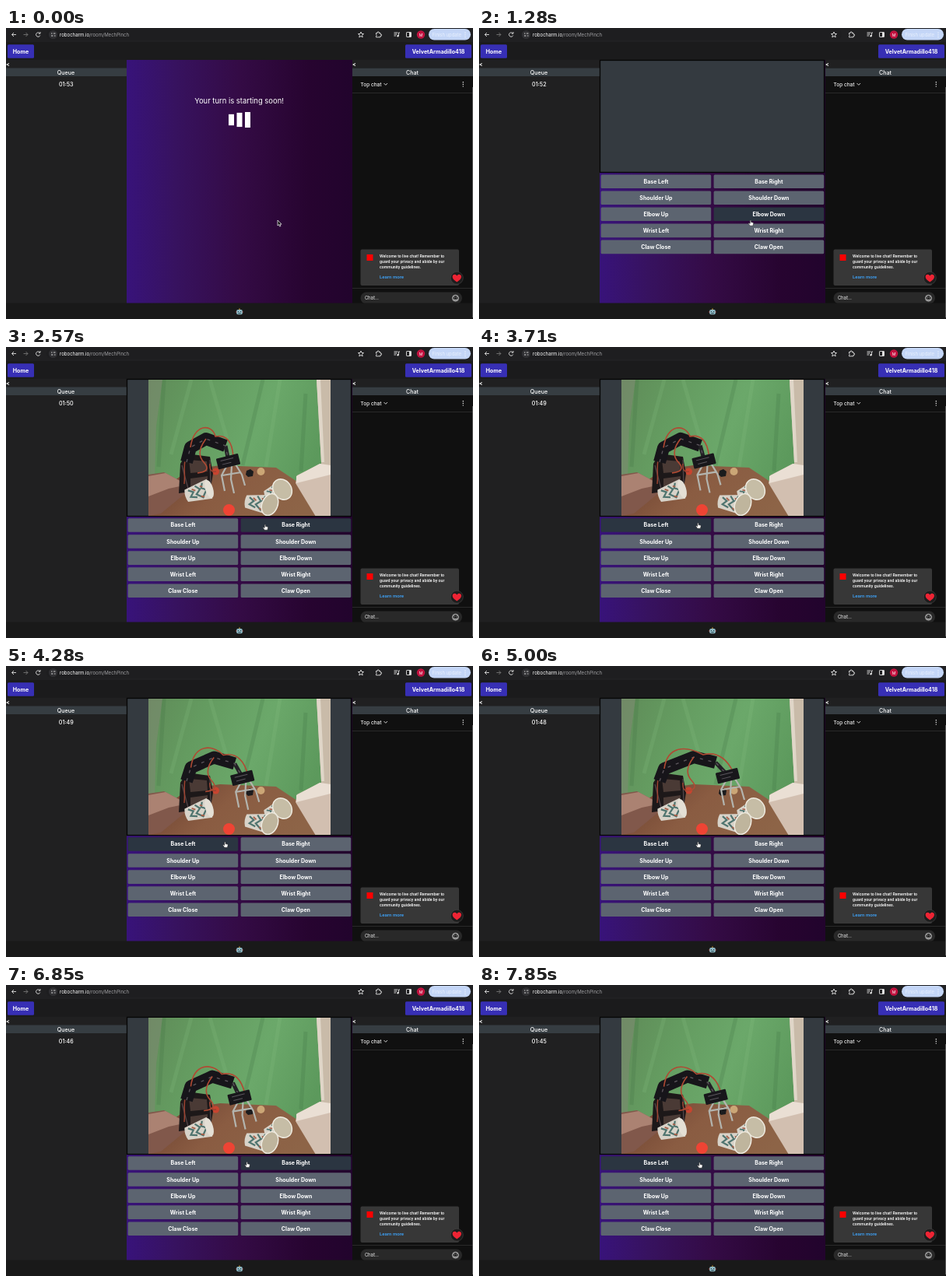
Animation, 600 px wide and 374 px high, one loop 8 s. Source, as an HTML page:

```html
<!DOCTYPE html>
<html lang="en">
<head>
<meta charset="utf-8">
<title>Robot room</title>
<style>
  html, body { margin: 0; width: 100%; height: 100%; overflow: hidden; background: #000; }
  svg { display: block; width: 100%; height: 100%; }
  text { font-family: Inter, sans-serif; fill: #fff; }
  .mid { text-anchor: middle; }
  .b { font-weight: 700; }
  .m { font-weight: 500; }
  .yt { font-family: Roboto, sans-serif; }
  .icon { fill: none; stroke: #e3e3e3; stroke-width: .9; }
</style>
</head>
<body>
<svg viewBox="0 0 600 374" preserveAspectRatio="none">
  <defs>
    <linearGradient id="purple">
      <stop offset="0" stop-color="#38137a"/>
      <stop offset=".22" stop-color="#37125f"/>
      <stop offset=".5" stop-color="#340b45"/>
      <stop offset=".8" stop-color="#270430"/>
      <stop offset="1" stop-color="#22042d"/>
    </linearGradient>
    <linearGradient id="cloth" x2="1" y2=".3">
      <stop offset="0" stop-color="#5f8b58"/>
      <stop offset=".3" stop-color="#649b60"/>
      <stop offset=".65" stop-color="#6ba86a"/>
      <stop offset="1" stop-color="#5c995c"/>
    </linearGradient>
    <linearGradient id="wood" x2="1" y2=".3">
      <stop offset="0" stop-color="#6a3f2f"/>
      <stop offset=".5" stop-color="#8a5c42"/>
      <stop offset="1" stop-color="#8d6447"/>
    </linearGradient>
    <clipPath id="photo"><rect x="183" y="42" width="234" height="175"/></clipPath>
    <g id="cup">
      <path d="M-18-8L13-13V13L-18 8Q-21 0-18-8Z" fill="#d8d3c9"/>
      <path d="M-14-6l6 4-5 5 8 3M-4-9l5 6-6 5 8 7M6-10l-3 6 6 4-7 8" fill="none" stroke="#4f746f" stroke-width="2.2"/>
      <path d="M-9-6l4 3M0 6l4 2M2-7l3 2" stroke="#a8604a" stroke-width="1.800"/>
    </g>
  </defs>

  <!-- browser bar -->
  <rect width="600" height="18" fill="#202022"/>
  <rect x="52" y="1.500" width="414" height="14" rx="7" fill="#1e1e20"/>
  <path class="icon" d="M13 8.500H7.500M10 6l-2.500 2.500L10 11M43.500 7a2.700 2.700 0 1 0 .3 2.500M44 5v2.200h-2.200"/>
  <path class="icon" style="stroke:#777" d="M22.500 8.500H28M25.500 6l2.500 2.500L25.500 11"/>
  <circle cx="60.500" cy="8.500" r="5.500" fill="#303033"/>
  <path class="icon" d="M58 7h1.500M61 7h2.500M58 10h2.500M62 10h1.500"/>
  <text x="69" y="10.700" font-size="6.050">robocharm.io<tspan fill="#a0a0a3">/room/MechPinch</tspan></text>
  <path class="icon" d="M456 5l1 2.400 2.500.2-1.900 1.700.6 2.500-2.200-1.300-2.200 1.300.6-2.500-1.900-1.700 2.500-.2z"/>
  <path class="icon" d="M475.500 6.500h1.700a1.100 1.100 0 1 1 2 0h1.800v1.700a1.100 1.100 0 1 1 0 2v1.600h-5.500v-1.500a1.100 1.100 0 0 0 0-2.100z"/>
  <path class="icon" d="M498.500 6h5M498.500 8h4M498.500 10h2.500M504.500 10V6h1.500"/>
  <circle cx="503.500" cy="10.300" r="1.200" fill="#e3e3e3"/>
  <rect class="icon" x="514.500" y="5.500" width="6" height="6" rx=".6"/>
  <path d="M518 5.500h2.500v6H518z" fill="#e3e3e3"/>
  <circle cx="533" cy="8.500" r="5.200" fill="#c2123f"/>
  <text class="mid" x="533" y="10.500" font-size="5.200">M</text>
  <rect x="543" y="1" width="54" height="14.500" rx="7.200" fill="#c4d6f7"/>
  <text x="547.500" y="10.600" font-size="5.900" style="fill:#e9f0fd">Finish update</text>
  <path d="M590 5.500v7" stroke="#eef3ff" stroke-width="1.200" stroke-dasharray="1.200 1.600"/>

  <!-- page frame -->
  <rect y="18" width="600" height="23.500" fill="#1b1b1c"/>
  <rect x="2" y="21.200" width="34" height="17.500" rx="1.500" fill="#372fb5"/>
  <text class="mid b" x="19" y="32.600" font-size="7.100">Home</text>
  <rect x="513" y="21.200" width="85" height="17.500" rx="1.500" fill="#372fb5"/>
  <text class="mid b" x="555.500" y="32.600" font-size="7.100">VelvetArmadillo418</text>
  <rect y="41" width="155" height="313" fill="#202021"/>
  <rect x="445" y="41" width="155" height="10.500" fill="#202021"/>
  <rect y="51.500" width="155" height="10.500" fill="#363d42"/>
  <rect x="445" y="51.500" width="155" height="10.500" fill="#363d42"/>
  <text class="b" x="0" y="48.800" font-size="7">&lt;</text>
  <text class="b" x="445" y="48.800" font-size="7">&lt;</text>
  <text class="mid m" x="77" y="59.600" font-size="7.100">Queue</text>
  <text class="mid m" x="522" y="59.600" font-size="7.100">Chat</text>
  <text class="mid m" id="timer" x="77.300" y="74.500" font-size="7.200"></text>
  <rect x="155" y="41" width="290" height="313" fill="url(#purple)"/>

  <!-- chat -->
  <rect x="445" y="62" width="155" height="292" fill="#101010"/>
  <path d="M445 83.500h155M445 334.500h155" stroke="#303030" stroke-width=".8"/>
  <text class="yt" x="455.500" y="74.500" font-size="7">Top chat</text>
  <path class="icon" d="M485.500 71l2.300 2.300 2.300-2.300"/>
  <path d="M587.300 69v7" stroke="#fff" stroke-width="1.200" stroke-dasharray="1.200 1.500"/>
  <rect x="455.500" y="284.500" width="126.500" height="46.500" rx="2" fill="#373737"/>
  <rect x="463.500" y="291" width="8" height="8" fill="#f00"/>
  <g font-size="5.250" font-weight="500">
    <text class="yt" x="480" y="295">Welcome to live chat! Remember to</text>
    <text class="yt" x="480" y="302">guard your privacy and abide by our</text>
    <text class="yt" x="480" y="309">community guidelines.</text>
    <text class="yt" x="480" y="321.800" font-size="6.100" style="fill:#3ea6ff">Learn more</text>
  </g>
  <circle cx="579.300" cy="321.300" r="8" fill="#1d1d1d" stroke="#484848" stroke-width=".6"/>
  <path d="M579.300 326.400c-3.500-2.300-5.700-4.300-5.700-6.700 0-3.600 4.300-3.900 5.700-1.100 1.400-2.800 5.700-2.500 5.700 1.100 0 2.400-2.200 4.400-5.700 6.700z" fill="#ee2434"/>
  <rect x="455.500" y="339.500" width="130.500" height="15" rx="7.500" fill="#292929"/>
  <text class="yt" x="461" y="349.300" font-size="6.300" style="fill:#ddd">Chat...</text>
  <g stroke-width=".8">
    <circle class="icon" cx="577.500" cy="347.200" r="3.900"/>
    <path class="icon" d="M575.300 348.200a2.400 2.400 0 0 0 4.400 0M576 345.300v1M579 345.300v1"/>
  </g>

  <!-- footer -->
  <rect y="353.500" width="600" height="20.500" fill="#191919"/>
  <path d="M599.600 76v296" stroke="#777" stroke-width=".8"/>
  <path d="M300 360.500v2" stroke="#d8a63a" stroke-width="1.200"/>
  <path d="M295.500 365h9" stroke="#d94f4f" stroke-width="1.500"/>
  <rect x="296.200" y="362" width="7.600" height="6.300" rx="1.800" fill="#8fb9c4"/>
  <path d="M297.900 364.500h1.100M301 364.500h1.100M298.200 366.700h3.600" stroke="#29434e"/>

  <g id="soon">
    <text class="mid" x="299.600" y="97" font-size="9.450">Your turn is starting soon!</text>
    <g id="bars" fill="#fff"></g>
  </g>

  <g id="play">
    <rect id="frame" x="155.500" y="41.500" width="288" fill="#343a40" stroke="#060606" stroke-width="1.300"/>
    <g id="video" clip-path="url(#photo)">
      <rect x="183" y="42" width="234" height="176" fill="url(#cloth)"/>
      <path d="M203 42l-7 112M330 42l-26 110M385 60l-6 100" fill="none" stroke="#3d6f41" stroke-width="5" opacity=".22"/>
      <path d="M238 42l-26 96M262 42l22 76M352 42l-18 112" fill="none" stroke="#86bd80" stroke-width="5" opacity=".2"/>
      <path d="M183 42h18l-8 60-2 68h-8z" fill="#7d8a72" opacity=".6"/>
      <path d="M399 42h18v176h-14l2-70z" fill="#c9bba9"/>
      <path d="M399 42h5l5 106h-4z" fill="#e0d6c8"/>
      <path d="M183 196l52-38 40-6 72 3 36 24 34 38H183z" fill="url(#wood)"/>
      <path d="M374 165l30-15 13 2v66h-19l-26-43z" fill="#d2bfb0"/>
      <path d="M373 166l30-16 14 2v12l-44 11z" fill="#eadfd4"/>
      <path d="M183 164l20-3 30 16v9l-34 28-16 3z" fill="#81584b"/>
      <path d="M183 166l22-4 28 15-24 5-26 10z" fill="#ab8272"/>
      <circle cx="327.500" cy="160" r="5" fill="#cba676"/>
      <circle cx="269.500" cy="160" r="4.500" fill="#c74430"/>
      <path d="M309 159l5-2 4 3-1 6-6 1-3-3z" fill="#1b1b1d"/>
      <path d="M222 188l2-38 8-13 30 4 4 22-3 18-26 5z" fill="#1d1819"/>
      <path d="M235 145l23 2 1 13-22 2zM237 169l22-3v8l-22 6z" fill="#4a3a35"/>
      <path d="M226 152l8 30M262 145l1 32" stroke="#514447" stroke-width="1.300"/>
      <path d="M237 134c-12 10-6 26-8 42M262 150q-1 12 8 10" fill="none" stroke="#9c4330" stroke-width="1.500"/>
      <g fill="none" stroke-linejoin="round">
        <path id="arm" stroke="#17151a" stroke-width="16"/>
        <path id="link" stroke="#242126" stroke-width="5"/>
        <path id="trim" stroke="#5d575d" stroke-width="1.300" stroke-dasharray="4 7"/>
        <path id="claw" stroke="#b3b4ae" stroke-width="2.200"/>
        <path id="cable" stroke="#b04a33" stroke-width="1.600"/>
      </g>
      <g id="servo"><rect x="-15" y="-7" width="29" height="14" rx="1" fill="#18171b"/><path d="M-10-3H7M-9 2H3" stroke="#5b565d"/></g>
      <use href="#cup" transform="translate(249 186) rotate(-17)"/>
      <ellipse cx="261" cy="182.500" rx="5" ry="12" transform="rotate(-17 261 182.500)" fill="#e4dfd5"/>
      <use href="#cup" transform="translate(347 185) rotate(-25) scale(.8)"/>
      <ellipse cx="355" cy="183" rx="11.500" ry="14" transform="rotate(-35 355 183)" fill="#c6bda6" stroke="#eeeadf" stroke-width="1.500"/>
      <use href="#cup" transform="translate(326 201) rotate(8)"/>
      <ellipse cx="339" cy="202.500" rx="10" ry="14.500" transform="rotate(22 339 202.500)" fill="#bfb59d" stroke="#eeeadf" stroke-width="1.500"/>
      <circle cx="286.500" cy="209.500" r="7.500" fill="#ee4434"/>
    </g>
    <g id="pad"></g>
  </g>

  <path id="arrow" d="M0 0v7l1.600-1.400 1.100 2.500 1.200-.5L2.800 5.200H5z" fill="#111" stroke="#fff" stroke-width=".7"/>
  <path id="hand" d="M-.8.700Q0-.5.600.700V2.600L3 3.100Q3.800 3.400 3.600 4.500L3 7.200H-.8L-2.800 4.400Q-2.900 3.400-1.800 3.800L-.8 4.600z" fill="#fff" stroke="#222" stroke-width=".6"/>
</svg>
<script>
const LOOP = 8000, FPS = 7;
const START = 700, VIDEO = 1850;
const KEY_W = 141.6, KEY_H = 17.6;
const $ = id => document.getElementById(id);
const show = (id, on) => $(id).style.display = on ? '' : 'none';
const set = (id, name, value) => $(id).setAttribute(name, value);

const labels = ['Base Left', 'Base Right', 'Shoulder Up', 'Shoulder Down', 'Elbow Up',
  'Elbow Down', 'Wrist Left', 'Wrist Right', 'Claw Close', 'Claw Open'];
const buttons = labels.map((label, i) => ({ x: i % 2 ? 301.6 : 156.6, y: 21.05 * (i >> 1) }));

$('pad').innerHTML = labels.map((label, i) => {
  const { x, y } = buttons[i];
  return `<rect x="${x}" y="${y}" width="${KEY_W}" height="${KEY_H}" rx="1.5"/>
    <text class="mid b" x="${x + KEY_W / 2}" y="${y + 11.3}" font-size="7">${label}</text>`;
}).join('');
const faces = [...$('pad').querySelectorAll('rect')];

$('bars').innerHTML = [286, 296.5, 307].map(x => `<rect x="${x}" width="7"/>`).join('');
const bars = [...$('bars').children];

// rows of [time, ...values], blended linearly
function track(rows, t) {
  const i = rows.findIndex(r => r[0] > t);
  if (i < 0) return rows[rows.length - 1].slice(1);
  const [a, b] = [rows[i - 1], rows[i]];
  const k = (t - a[0]) / (b[0] - a[0]);
  return a.slice(1).map((v, j) => v + (b[j + 1] - v) * k);
}

const pointer = [[0, 349, 247], [1750, 349, 247], [2300, 333, 228], [2850, 333, 228],
  [3400, 281.5, 226], [5150, 281.5, 226], [5700, 316, 227], [6750, 316, 227], [7300, 283.5, 228]];
const swing = [[0, 0], [2570, 0], [3500, 0], [3710, .1], [4900, 1], [5750, 1], [6000, .9],
  [7000, .35], [7400, .35], [7850, .55]];

function drawArm(u) {
  const at = (x0, y0, x1, y1) => [x0 + (x1 - x0) * u, y0 + (y1 - y0) * u];
  const knee = at(237, 129, 238, 132), top = at(257, 118, 276, 117);
  const elbow = at(282, 127, 304, 124), wrist = at(286, 147, 320, 141);
  const [kx, ky] = knee, [ex, ey] = elbow, [x, y] = wrist;
  const line = `M232 148L${knee}L${top}L${elbow}`;
  set('arm', 'd', line);
  set('link', 'd', `M${elbow}L${wrist}`);
  set('trim', 'd', `${line}L${wrist}`);
  set('cable', 'd', `M${kx} ${ky}C${kx + 4} ${98 + 4 * u} ${kx + 28} ${98 + 4 * u} ${top[0] + 12} ${top[1] - 3}
    Q${ex + 8} ${ey - 16} ${x + 6} ${y - 6}M${top}q-14 18-3 30t-8 14`);
  set('claw', 'd', `M${x - 2} ${y + 5}l-7 13 4 20M${x + 4} ${y + 5}l-1 18 4 18M${x + 9} ${y + 4}l8 13 4 14M${x - 8} ${y + 18}l24-4`);
  set('servo', 'transform', `translate(${wrist}) rotate(-14)`);
}

function draw(ms) {
  const step = Math.floor((Math.floor(ms / 10) * 10 + 9.99) * FPS / 1000);
  const t = step * 1000 / FPS;
  const playing = t >= START, live = t >= VIDEO;

  $('timer').textContent = `01:${53 - Math.floor((t + 600) / 1000)}`;
  show('soon', !playing);
  show('play', playing);
  show('video', live);

  bars.forEach((bar, i) => {
    const h = 16 + 4 * Math.cos(2 - i + t * Math.PI * 2 / 1000);
    bar.setAttribute('height', h);
    bar.setAttribute('y', 118 - h / 2);
  });

  const [x, y] = track(pointer, t);
  const padY = live ? 220.2 : 188.4;
  set('frame', 'height', live ? 176 : 144);
  set('pad', 'transform', `translate(0 ${padY})`);
  let over = false;
  buttons.forEach((b, i) => {
    const dx = x - b.x, dy = y - padY - b.y;
    const hit = playing && dx >= 0 && dx <= KEY_W && dy >= 0 && dy <= KEY_H;
    faces[i].setAttribute('fill', hit ? '#2b3541' : '#5c6470');
    over = over || hit;
  });
  show('hand', over);
  show('arrow', !over);
  set(over ? 'hand' : 'arrow', 'transform', `translate(${x} ${y})`);
  drawArm(track(swing, t)[0]);
}

const begin = performance.now();
function tick() {
  draw((performance.now() - begin) % LOOP);
  requestAnimationFrame(tick);
}
tick();
</script>
</body>
</html>
```
